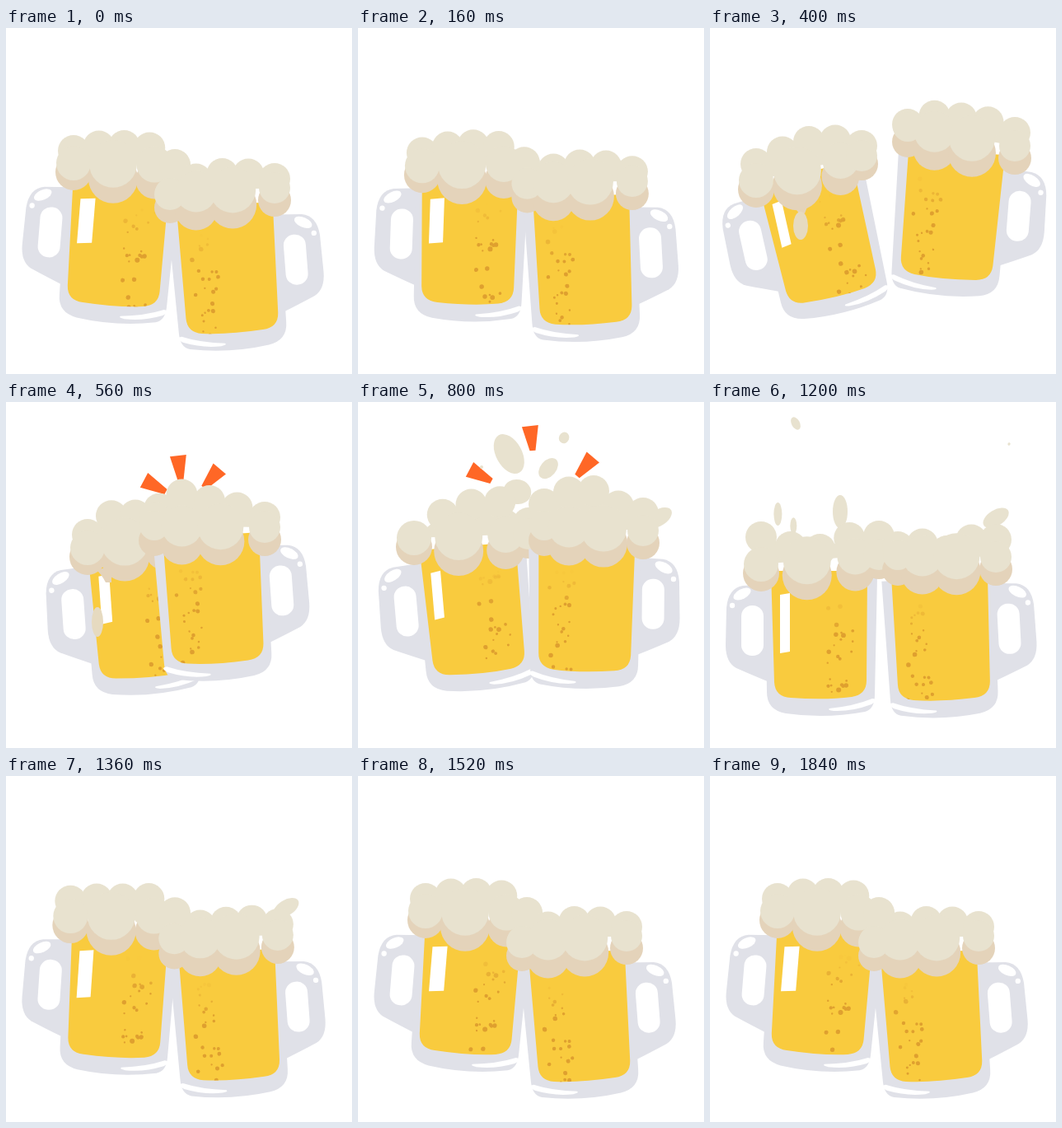
Animation of 420x420 px, one loop 1920 ms. Source, as an HTML page with a canvas:

```html
<!DOCTYPE html>
<html lang="en">
<head>
<meta charset="utf-8">
<title>Cheers</title>
<style>
html, body { margin: 0; width: 100%; height: 100%; overflow: hidden; background: #fff; }
canvas { display: block; width: 100vmin; height: 100vmin; }
</style>
</head>
<body>
<canvas id="stage" width="420" height="420"></canvas>
<script>
const LOOP = 1920, STEP = 80, TAU = Math.PI * 2;
const GLASS = '#e0e1e8', BEER = '#f9cb3e', CREAM = '#e8e2cf', SHADE = '#e4d3ba',
      BUBBLE = '#dfa02f', SPARK = '#ff6726', WHITE = '#fff';
const ctx = document.getElementById('stage').getContext('2d');

const lerp = (a, b, u) => a + (b - a) * u;
const mix = (a, b, u) => a.map((v, i) => lerp(v, b[i], u));
const smooth = u => u * u * (3 - 2 * u);
const easeIn = u => Math.pow(u, 1.7);
const easeOut = u => 1 - (1 - u) * (1 - u);

// Each segment: end time, pose reached, easing.
const segments = [
  [80, 'rest', smooth], [400, 'apart', smooth], [560, 'clash', easeIn],
  [800, 'splash', easeOut], [1200, 'fall', easeIn], [1480, 'rest', easeOut], [LOOP, 'rest', smooth]
];

// One mug, standing on (0, 0), handle on the left.
const shape = {
  body: 'M-68-148L-66-8Q-66 14-43 18Q5 25 53 16Q65 13 65-5L68-148Z',
  handle: 'M-63-139L-95-137Q-113-134-115-110L-116-65Q-116-44-103-37Q-85-29-63-20Z',
  beer: 'M-61-155L-57-20Q-56-2-37-1Q5 2 37-2Q55-5 55-22L56-155Z',
  shine: 'M10 12Q40 9 62 0Q71 1 61 7Q37 16 15 15Q7 14 10 12Z'
};
for (const k in shape) shape[k] = new Path2D(shape[k]);

// Pose: mug x, y, degrees; foam ends x, y, x, y; five bump heights; reflection w, h.
const left = {
  flip: 1, drift: -5, at: [0, .39, .8, 1], size: [21, 29, 22, 19], sag: [11, 18, 19, 10],
  rest: [130, 337, 4.7, 82, 164, 205, 166, 15, 21, 22, 20, -1, 18, 54],
  apart: [152, 326, -12.7, 56, 185, 184, 155, 20, 27, 32, 26, 12, 12, 54],
  clash: [171, 334, -4, 99, 177, 215, 158, 16, 34, 30, 33, 10, 13, 58],
  splash: [149, 329, -5, 68, 165, 207, 160, 0, 27, 38, 40, 13, 12, 57],
  fall: [135, 360, 0, 62, 197, 205, 185, 33, 18, 12, 23, 22, 12, 71]
};
const right = {
  flip: -1, drift: 9, at: [0, .25, .6, 1], size: [18, 25, 28, 19], sag: [18, 21, 18, 15],
  rest: [275, 370, -4.5, 199, 200, 326, 194, -2, 15, 20, 18, 11],
  apart: [285, 304, 4.5, 240, 120, 370, 143, 3, 19, 22, 23, 16],
  clash: [257, 317, -4, 180, 150, 314, 152, 10, 38, 31, 23, 12],
  splash: [274, 327, .5, 226, 150, 346, 156, 26, 42, 45, 28, 21],
  fall: [284, 362, -3, 228, 186, 347, 188, 10, 14, 6, 20, 21]
};

// Flying foam: start t, x, y; end t, x, y; lift, rx, ry, turn, shrink.
const drops = [
  [640, 215, 95, 1200, 104, 26, 15, 20, 33, -.5, .75],
  [640, 225, 115, 1040, 240, 125, 40, 10, 15, .7, .1],
  [640, 205, 85, 1200, 363, 51, 39, 8, 9, .4, .8],
  [720, 158, 92, 880, 142, 66, 0, 2, 2, 0, 0],
  [960, 92, 75, 1360, 76, 180, 2, 5, 14, 0, 0],
  [1040, 106, 95, 1280, 99, 178, 0, 4, 10, 0, 0],
  [640, 190, 125, 880, 195, 125, 18, 17, 15, .2, 0],
  [1040, 155, 150, 1360, 161, 158, 21, 9, 20, 0, 0],
  [640, 372, 160, 1360, 340, 160, 28, 18, 10, -.55, .05]
];

// Drip from the left foam: time, x, y, width, height.
const dribble = [[320, 112, 222, 7, 8], [400, 110, 240, 9, 17], [560, 111, 267, 7, 18]];
const cone = [[240, 104, 200, 22, 4], [400, 108, 200, 24, 25], [560, 121, 203, 12, 16]];

// Sparks: inner end x, y, degrees, travel x, y.
const sparks = [[194, 109, 208, -32, -13], [212, 95, 264, 0, -36], [240, 104, 310, 26, -14]];

let seed = 17;
const rnd = () => (seed = (seed * 16807) % 2147483647) / 2147483647;
for (const m of [left, right]) {
  m.bubbles = Array.from({ length: 25 }, () => ({
    x: (rnd() + rnd() - 1) * 20, phase: rnd(), r: 1.1 + rnd() * 2
  }));
}

function keyed(keys, t) {
  for (let i = 1; i < keys.length; i++) {
    const a = keys[i - 1], b = keys[i];
    if (t >= a[0] && t <= b[0]) return mix(a, b, (t - a[0]) / (b[0] - a[0])).slice(1);
  }
  return null;
}

function poseAt(m, t) {
  let start = 0, from = 'rest';
  for (const [end, to, ease] of segments) {
    if (t < end) return mix(m[from], m[to], ease((t - start) / (end - start)));
    start = end;
    from = to;
  }
}

function fill(color, path) {
  ctx.fillStyle = color;
  path ? ctx.fill(path) : ctx.fill();
}

function oval(x, y, rx, ry, turn, color) {
  ctx.beginPath();
  ctx.ellipse(x, y, rx, ry, turn, 0, TAU);
  fill(color);
}

function poly(points, color) {
  ctx.beginPath();
  for (const [x, y] of points) ctx.lineTo(x, y);
  ctx.closePath();
  fill(color);
}

function circles(list, color) {
  for (const [x, y, r] of list) oval(x, y, r, r, 0, color);
}

function drawBubbles(m, t) {
  ctx.save();
  ctx.clip(shape.beer);
  const middle = m === left ? 23 : 29;
  for (const b of m.bubbles) {
    const rise = (b.phase + t / LOOP) % 1;
    const sway = Math.sin(rise * 9 + b.phase * 20) * 2;
    ctx.globalAlpha = Math.min(1, (1 - rise) * 3);
    oval(middle + b.x + sway, 2 - rise * 125, b.r, b.r, 0, BUBBLE);
  }
  ctx.restore();
}

function drawMug(m, [x, y, deg], bar, t) {
  ctx.save();
  ctx.translate(x, y);
  ctx.rotate(deg * Math.PI / 180);
  ctx.scale(m.flip, 1);
  fill(GLASS, shape.handle);
  ctx.beginPath();
  ctx.roundRect(-97, -113, 27, 61, 13);
  fill(WHITE);
  fill(GLASS, shape.body);
  fill(BEER, shape.beer);
  drawBubbles(m, t);
  fill(WHITE, shape.shine);
  oval(-96, -127, 11.5, 6, -.5, WHITE);
  oval(-108, -113, 3.2, 3.2, 0, WHITE);
  if (bar.length) {
    const [w, h] = bar;
    poly([[-50, -126], [w - 50, -128], [w - 50, h - 128], [-50, h - 126]], WHITE);
  }
  ctx.restore();
}

function drawFoam(m, [x0, y0, x1, y1], heights) {
  const spot = (f, up) => [lerp(x0, x1, f), lerp(y0, y1, f) - up];
  const lobes = m.at.map((f, i) => [...spot(f, 0), m.size[i]]);
  const bumps = heights.map((h, i) => [...spot(i / 4, h), 19]);
  circles(lobes.map(([x, y, r], i) => [x, y + m.sag[i], r + 1]), SHADE);
  poly([...bumps, ...lobes.slice().reverse()], CREAM);
  circles([...bumps, ...lobes], CREAM);
}

function drawDrip(t) {
  const c = keyed(cone, t), d = keyed(dribble, t);
  if (c) {
    const [x, y, w, h] = c;
    ctx.beginPath();
    ctx.moveTo(x - w, y);
    ctx.quadraticCurveTo(x - w * .4, y + h * .4, x, y + h);
    ctx.lineTo(x + 7, y + h);
    ctx.quadraticCurveTo(x + w * .5, y + h * .4, x + w, y - 3);
    fill(SHADE);
  }
  if (d) oval(...d, 0, '#e6dac0');
}

function drawSparks(t) {
  if (t < 560 || t >= 960) return;
  const u = easeOut(Math.min(1, (t - 560) / 240));
  const gone = Math.max(0, (t - 800) / 160);
  for (const [x, y, deg, dx, dy] of sparks) {
    ctx.save();
    ctx.translate(x + dx * u, y + dy * u);
    ctx.rotate(deg * Math.PI / 180);
    const a = 30 * gone, b = 30 + 12 * gone, wide = 10 - 5 * gone;
    poly([[a, -3.5], [b, -wide], [b, wide], [a, 3.5]], SPARK);
    ctx.restore();
  }
}

function drawDrops(t) {
  for (const [t0, x0, y0, t1, x1, y1, lift, rx, ry, turn, shrink] of drops) {
    if (t < t0 || t > t1) continue;
    const u = (t - t0) / (t1 - t0), k = 1 - shrink * u;
    oval(lerp(x0, x1, u), lerp(y0, y1, u) - lift * 4 * u * (1 - u), rx * k, ry * k, turn, CREAM);
  }
}

function drawSide(m, t) {
  const pose = poseAt(m, t);
  const swing = t > 800 && t < 1200 ? Math.sin((t - 800) / 400 * Math.PI) : 0;
  ctx.save();
  ctx.translate(m.drift * swing, 0);
  drawMug(m, pose, pose.slice(12), t);
  if (m === left) drawDrip(t);
  drawFoam(m, pose.slice(3, 7), pose.slice(7, 12));
  ctx.restore();
}

function draw(t) {
  ctx.fillStyle = WHITE;
  ctx.fillRect(0, 0, 420, 420);
  drawSparks(t);
  drawDrops(t);
  drawSide(left, t);
  drawSide(right, t);
}

const begin = performance.now();
function tick() {
  const t = (performance.now() - begin) % LOOP;
  draw(Math.floor(t / STEP) * STEP);
  requestAnimationFrame(tick);
}
tick();
</script>
</body>
</html>
```
